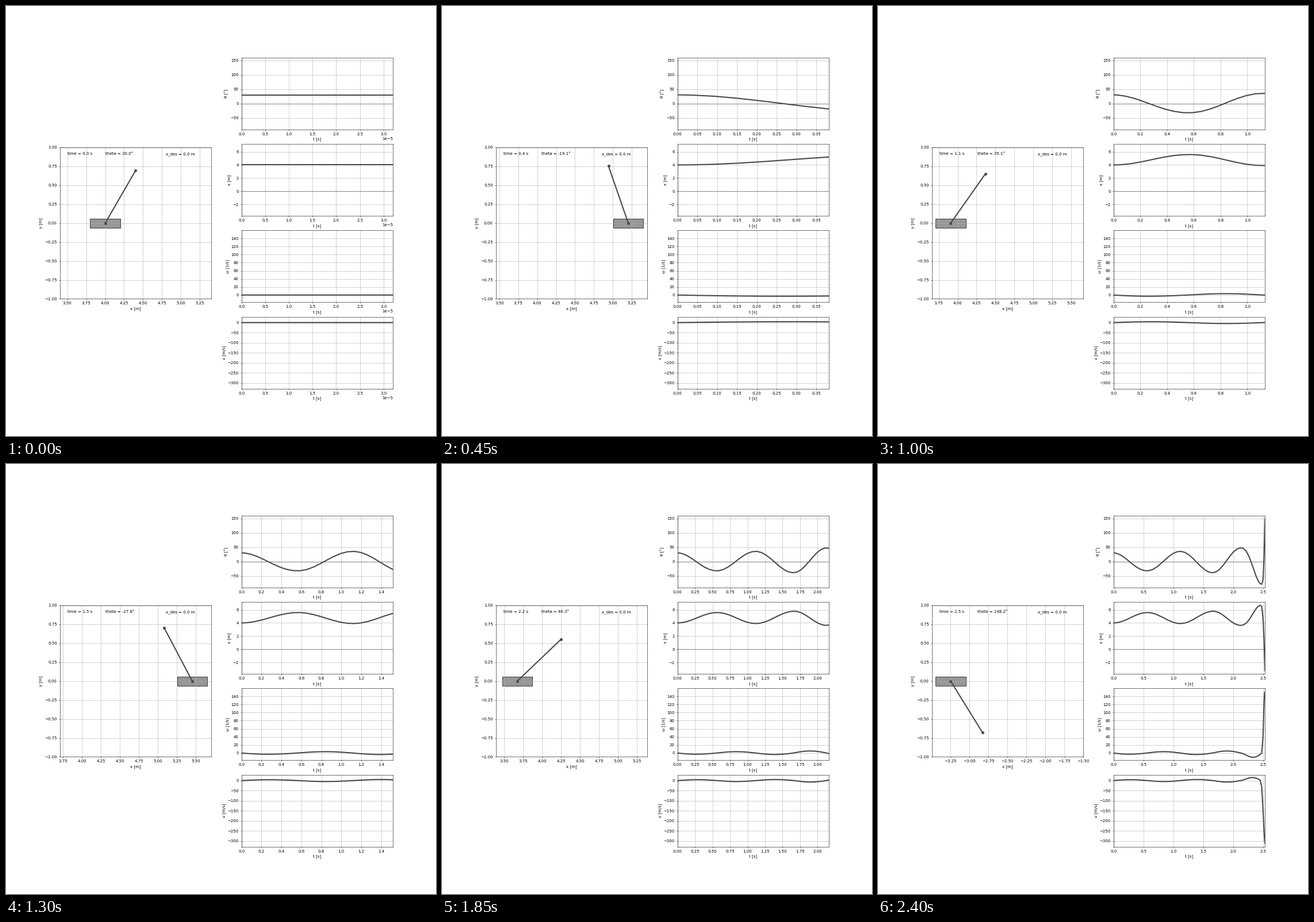
Recreate the animation shown at these times as a matplotlib script. Size 748 by 748 pixels, loop 2.45 s.

```python
import numpy as np
import matplotlib.pyplot as plt
from matplotlib.animation import FuncAnimation
from matplotlib.patches import Rectangle

SIZE, DPI = 748, 50
FRAMES, INTERVAL = 49, 50
DARK, CART = "#4a4a4a", "#979797"
ROD, CART_W, CART_H = 0.8, 0.4, 0.12
VIEW, MARGIN = 2.0, 0.25
END = 2.53

# Turning points: time, value, skew of the swing that leads there
ANGLE = [(0, 30, 1), (0.56, -32.5, 0.955), (1.115, 35.3, 1),
         (1.6565, -39.2, 1), (2.129, 47.5, 1), (2.475, -79.3, 1.19),
         (2.5425, 204.6, 1.7)]
POSITION = [(0, 4, 1), (0.566, 5.58, 1), (1.118, 3.905, 1),
            (1.668, 5.78, 1), (2.125, 3.63, 1), (2.46, 6.69, 1.19),
            (2.5748, -13.17, 1.4)]


def swing(points, t):
    """Cosine easing from one turning point to the next."""
    when, value, skew = np.array(points).T
    i = np.clip(np.searchsorted(when, t, side="right") - 1, 0, len(when) - 2)
    s = np.maximum(t - when[i], 0) / (when[i + 1] - when[i])
    ease = (1 - np.cos(np.pi * s ** skew[i + 1])) / 2
    return value[i] + (value[i + 1] - value[i]) * ease


def rate(points, t, h=1e-5):
    return (swing(points, t + h) - swing(points, t - h)) / (2 * h)


def step_times():
    """Solver steps: tenfold growth, a steady run, then ever finer steps."""
    start = 3.2e-5 * (10.0 ** np.arange(1, 5) - 1) / 9
    steady = np.interp(np.arange(4, 42), [3, 9, 20, 26, 33, 41],
                       [start[-1], 0.382, 1.132, 1.518, 1.945, 2.38])
    left = 1 - np.arange(1, 8) / 7
    return np.concatenate([[0], start, steady,
                           END - (END - steady[-1]) * left ** 1.8])


def view_edges(xs, left):
    """Left edge of the view, pushed along when the cart gets near a side."""
    edges = []
    for x in xs:
        left = min(max(left, x + MARGIN - VIEW), x - MARGIN)
        edges.append(left)
    return edges


times = step_times()
theta, pos = swing(ANGLE, times), swing(POSITION, times)
omega, vel = np.radians(rate(ANGLE, times)), rate(POSITION, times)
edges = view_edges(pos[1:], 3.4)

fig = plt.figure(figsize=(SIZE / DPI, SIZE / DPI), dpi=DPI)
grid = fig.add_gridspec(4, 2)

scene = fig.add_subplot(grid[:, 0])
scene.set_aspect("equal")
scene.set_ylim(-1, 1)
scene.set_xlabel("x [m]")
scene.set_ylabel("y [m]")
scene.grid()
cart = scene.add_patch(Rectangle((0, -CART_H / 2), CART_W, CART_H,
                                 facecolor=CART, edgecolor="black"))
rod, = scene.plot([], [], "o-", color=DARK, lw=3)
clock, tilt, goal = (scene.text(x, 0.95, "", transform=scene.transAxes)
                     for x in (0.05, 0.3, 0.7))
goal.set_text("x_des = 0.0 m")

# label, data, vertical limits, dashed zero line
PLOTS = [
    ("θ [°]", theta, (-90.7, 159.5), True),
    ("x [m]", pos, (-3.74, 7.18), True),
    ("ω [1/s]", omega, (-18.1, 159.9), False),
    ("v [m/s]", vel, (-328.6, 29.1), False),
]
charts = []
for row, (label, data, limits, zero) in enumerate(PLOTS):
    ax = fig.add_subplot(grid[row, 1])
    ax.set_ylim(limits)
    ax.set_xlabel("t [s]")
    ax.set_ylabel(label)
    ax.grid()
    if zero:
        ax.axhline(0, color="black", ls="--", lw=0.75)
    line, = ax.plot([], [], color=DARK, lw=3)
    charts.append((ax, line, data))


def draw(frame):
    n = frame + 1
    t, x, angle = times[n], pos[n], theta[n]
    scene.set_xlim(edges[frame], edges[frame] + VIEW)
    cart.set_x(x - CART_W / 2)
    a = np.radians(angle)
    rod.set_data([x, x + ROD * np.sin(a)], [0, ROD * np.cos(a)])
    clock.set_text(f"time = {t:.1f} s")
    tilt.set_text(f"theta = {angle:.1f}°")
    for ax, line, data in charts:
        line.set_data(times[:n + 1], data[:n + 1])
        ax.set_xlim(0, t)
    return []


anim = FuncAnimation(fig, draw, frames=FRAMES, interval=INTERVAL,
                     init_func=lambda: draw(0), repeat=True, repeat_delay=0)
plt.show()
```
